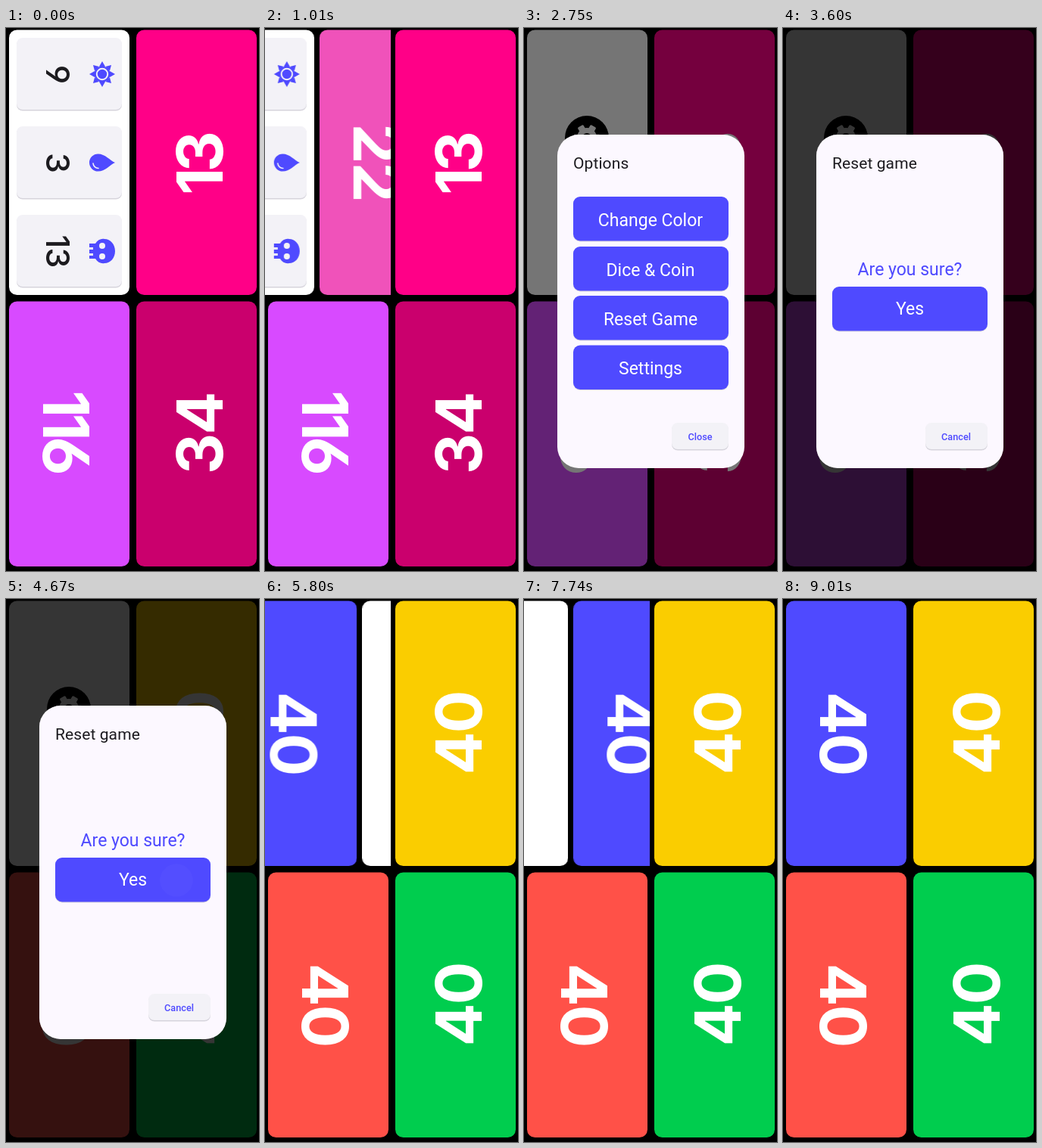
Animation, 334 px wide and 718 px high, one loop 9130 ms. Source, as an HTML page:

```html
<!DOCTYPE html>
<html lang="en">
<head>
<meta charset="utf-8">
<title>Life counter</title>
<style>
  html, body { margin: 0; width: 100%; height: 100%; overflow: hidden; background: #000; }
  svg { display: block; width: 334px; height: 718px; }
  text { font-family: Roboto, sans-serif; text-anchor: middle; }

  .num, .count { font-feature-settings: "cv03", "cv04"; }
  .num { font: 700 84.5px Inter, sans-serif; letter-spacing: -2px; fill: #fff; }
  .tight { letter-spacing: -6px; }
  .count { font: 500 43px Inter, sans-serif; letter-spacing: -1px; fill: #1c1b1f; }
  .num, .count { font-feature-settings: "cv03", "cv04"; }
  .title { font-size: 21px; letter-spacing: .1px; text-anchor: start; fill: #1c1b1f; }
  .label { font-size: 23px; fill: #fff; }
  .small { font-size: 12.7px; font-weight: 500; }
  .blue { fill: #4f4aff; }
  .tile { fill: #f3f2f7; }
  .edge { fill: #d6d4dc; }

  .track, .before, .after, .dialog, .ripple { animation: 9130ms linear infinite; }
  .track { animation-name: swipe; }
  .before { animation-name: before; animation-timing-function: step-end; }
  .after { animation-name: after; animation-timing-function: step-end; }
  .options { animation-name: options; }
  .confirm { animation-name: confirm; }
  .ripple { fill: #fff; opacity: 0; transform-box: fill-box; transform-origin: center; }
  .tap-reset { animation-name: tap-reset; }
  .tap-yes { animation-name: tap-yes; }

  @keyframes swipe {
    0% { transform: translateX(0); }
    9.2% { transform: translateX(0); animation-timing-function: cubic-bezier(.35, .25, .25, 1); }
    14.57% { transform: translateX(-166px); }
    17.96% { transform: translateX(-166px); animation-timing-function: cubic-bezier(.35, .2, .5, .95); }
    20.59% { transform: translateX(-323px); animation-timing-function: ease-out; }
    22.78% { transform: translateX(-332px); }
    60.9% { transform: translateX(-332px); animation-timing-function: cubic-bezier(.4, .1, .8, .9); }
    63.53% { transform: translateX(-208px); animation-timing-function: cubic-bezier(.15, .6, .3, 1); }
    67.36% { transform: translateX(-166px); }
    71.08% { transform: translateX(-166px); animation-timing-function: cubic-bezier(.4, .1, .8, .9); }
    74.48% { transform: translateX(-34px); animation-timing-function: cubic-bezier(.15, .6, .3, 1); }
    78.31% { transform: translateX(0); }
    82.8% { transform: translateX(0); animation-timing-function: cubic-bezier(.35, .25, .25, 1); }
    88.17%, 100% { transform: translateX(-166px); }
  }
  @keyframes before { 0% { opacity: 1; } 50.05%, 100% { opacity: 0; } }
  @keyframes after { 0% { opacity: 0; } 50.05%, 100% { opacity: 1; } }
  @keyframes options {
    0%, 27.38% { opacity: 0; }
    29.35%, 51.48% { opacity: 1; }
    53.45%, 100% { opacity: 0; }
  }
  @keyframes confirm {
    0%, 36.8% { opacity: 0; }
    38.55%, 51.48% { opacity: 1; }
    53.45%, 100% { opacity: 0; }
  }
  @keyframes tap-reset {
    0%, 33.5% { opacity: 0; transform: scale(.3); }
    34.5% { opacity: .1; }
    36.8%, 100% { opacity: 0; transform: scale(1.1); }
  }
  @keyframes tap-yes {
    0%, 49.5% { opacity: 0; transform: scale(.3); }
    50.3% { opacity: .05; }
    51.2% { opacity: .03; transform: scale(1); }
    52.5%, 100% { opacity: 0; transform: scale(1.1); }
  }
</style>
</head>
<body>
<svg viewBox="0 0 334 718">
  <defs>
    <rect id="card" y=".5" width="159" height="350.5" rx="10.5"/>
    <g id="tile">
      <rect class="edge" y="1.5" width="139" height="95" rx="8"/>
      <rect class="tile" width="139" height="95" rx="8"/>
    </g>
    <g id="button">
      <rect class="edge" y="1" width="205" height="58.5" rx="9"/>
      <rect class="blue" width="205" height="58.5" rx="9"/>
    </g>
    <g id="sheet">
      <rect width="334" height="718" fill="#000" opacity=".54"/>
      <rect x="44" y="141" width="247" height="441" rx="28" fill="#fcf8ff"/>
    </g>
    <path id="ray" d="M-4-10 0-17 4-10Z"/>
    <rect id="tooth" x="-4.3" y="-17.5" width="8.6" height="35" rx="1.5"/>
    <clipPath id="view"><rect x=".5" width="165.5" height="357"/></clipPath>
  </defs>

  <rect width="334" height="718"/>

  <g clip-path="url(#view)">
    <g class="track">
      <!-- counters -->
      <use href="#card" x="4" y="2" fill="#fff"/>
      <g class="before">
        <use href="#tile" x="14" y="13"/>
        <use href="#tile" x="14" y="130"/>
        <use href="#tile" x="14" y="247"/>
        <text class="count" transform="translate(69 61) rotate(90)" y="15.6">9</text>
        <text class="count" transform="translate(69 178) rotate(90)" y="15.6">3</text>
        <text class="count" transform="translate(69 295) rotate(90)" y="15.6">13</text>
        <g class="blue" transform="translate(127 61)">
          <use href="#ray"/>
          <use href="#ray" transform="rotate(45)"/>
          <use href="#ray" transform="rotate(90)"/>
          <use href="#ray" transform="rotate(135)"/>
          <use href="#ray" transform="rotate(180)"/>
          <use href="#ray" transform="rotate(225)"/>
          <use href="#ray" transform="rotate(270)"/>
          <use href="#ray" transform="rotate(315)"/>
          <circle r="10.5"/>
          <circle r="7.2" fill="none" stroke="#f3f2f7" stroke-width="2"/>
        </g>
        <g transform="translate(127 178)">
          <path class="blue" d="M17 0C10-3 4-11.5-5.5-11.5A11.5 11.5 0 0 0-5.5 11.5C4 11.5 10 3 17 0Z"/>
          <path d="M-12 1A7 7 0 0 0-5 7.5" fill="none" stroke="#f3f2f7" stroke-width="1.6" stroke-linecap="round"/>
        </g>
        <g transform="translate(127 295)">
          <path class="blue" d="M-17-10H-9C-6-15-1-17 3-16C11-16 17-9 17 0S11 16 3 16C-1 17-6 15-9 10H-17V6H-12V3H-17V-2H-12V-5H-17Z"/>
          <circle cx="0" cy="-7" r="4" fill="#f3f2f7"/>
          <circle cx="0" cy="7" r="4" fill="#f3f2f7"/>
        </g>
      </g>

      <!-- player -->
      <g transform="translate(166)">
        <g class="before">
          <use href="#card" x="4" y="2" fill="#f052ba"/>
          <text class="num" transform="translate(80 177.5) rotate(90)" y="31">22</text>
        </g>
        <g class="after">
          <use href="#card" x="4" y="2" fill="#4f4aff"/>
          <text class="num" transform="translate(80 177.5) rotate(90)" y="31">40</text>
        </g>
      </g>

      <!-- menu -->
      <g transform="translate(332)">
        <use href="#card" x="4" y="2" fill="#fff"/>
        <circle cx="83" cy="145" r="29"/>
        <g transform="translate(83 145)" fill="#fff">
          <circle r="13"/>
          <use href="#tooth" transform="rotate(30)"/>
          <use href="#tooth" transform="rotate(90)"/>
          <use href="#tooth" transform="rotate(150)"/>
          <circle r="6" fill="#000"/>
        </g>
        <circle cx="83" cy="210" r="29"/>
        <path d="M71 210H95M83 198V222" stroke="#fff" stroke-width="2.8"/>
      </g>
    </g>
  </g>

  <g class="before">
    <use href="#card" x="172" y="2" fill="#ff0087"/>
    <use href="#card" x="4" y="361" fill="#d84aff"/>
    <use href="#card" x="172" y="361" fill="#ca006d"/>
    <text class="num tight" transform="translate(254.5 177.5) rotate(-90)" x="-4" y="31">13</text>
    <text class="num tight" transform="translate(80 536.5) rotate(90)" x="-4" y="31">116</text>
    <text class="num" transform="translate(254.5 536.5) rotate(-90)" y="31">34</text>
  </g>
  <g class="after">
    <use href="#card" x="172" y="2" fill="#facd00"/>
    <use href="#card" x="4" y="361" fill="#ff5148"/>
    <use href="#card" x="172" y="361" fill="#00cd4e"/>
    <text class="num" transform="translate(254.5 177.5) rotate(-90)" y="31">40</text>
    <text class="num" transform="translate(80 536.5) rotate(90)" y="31">40</text>
    <text class="num" transform="translate(254.5 536.5) rotate(-90)" y="31">40</text>
  </g>

  <g class="dialog options">
    <use href="#sheet"/>
    <text class="title" x="65" y="186">Options</text>
    <use href="#button" x="65" y="223"/>
    <use href="#button" x="65" y="289"/>
    <use href="#button" x="65" y="354"/>
    <use href="#button" x="65" y="419.5"/>
    <circle class="ripple tap-reset" cx="225" cy="383" r="26"/>
    <text class="label" x="167" y="262">Change Color</text>
    <text class="label" x="167" y="327.5">Dice &amp; Coin</text>
    <text class="label" x="167" y="392.5">Reset Game</text>
    <text class="label" x="167" y="458">Settings</text>
    <rect class="edge" x="195" y="523.5" width="75" height="35" rx="8"/>
    <rect class="tile" x="195" y="522" width="75" height="35" rx="8"/>
    <text class="small blue" x="232.5" y="545">Close</text>
  </g>

  <g class="dialog confirm">
    <use href="#sheet"/>
    <text class="title" x="65" y="186">Reset game</text>
    <text class="label" x="167.5" y="327" style="fill: #4f4aff">Are you sure?</text>
    <use href="#button" x="65" y="342"/>
    <circle class="ripple tap-yes" cx="225" cy="372" r="22"/>
    <text class="label" x="167.5" y="379">Yes</text>
    <rect class="edge" x="188" y="523.5" width="82" height="35" rx="8"/>
    <rect class="tile" x="188" y="522" width="82" height="35" rx="8"/>
    <text class="small blue" x="228.5" y="545">Cancel</text>
  </g>
</svg>
</body>
</html>
```
